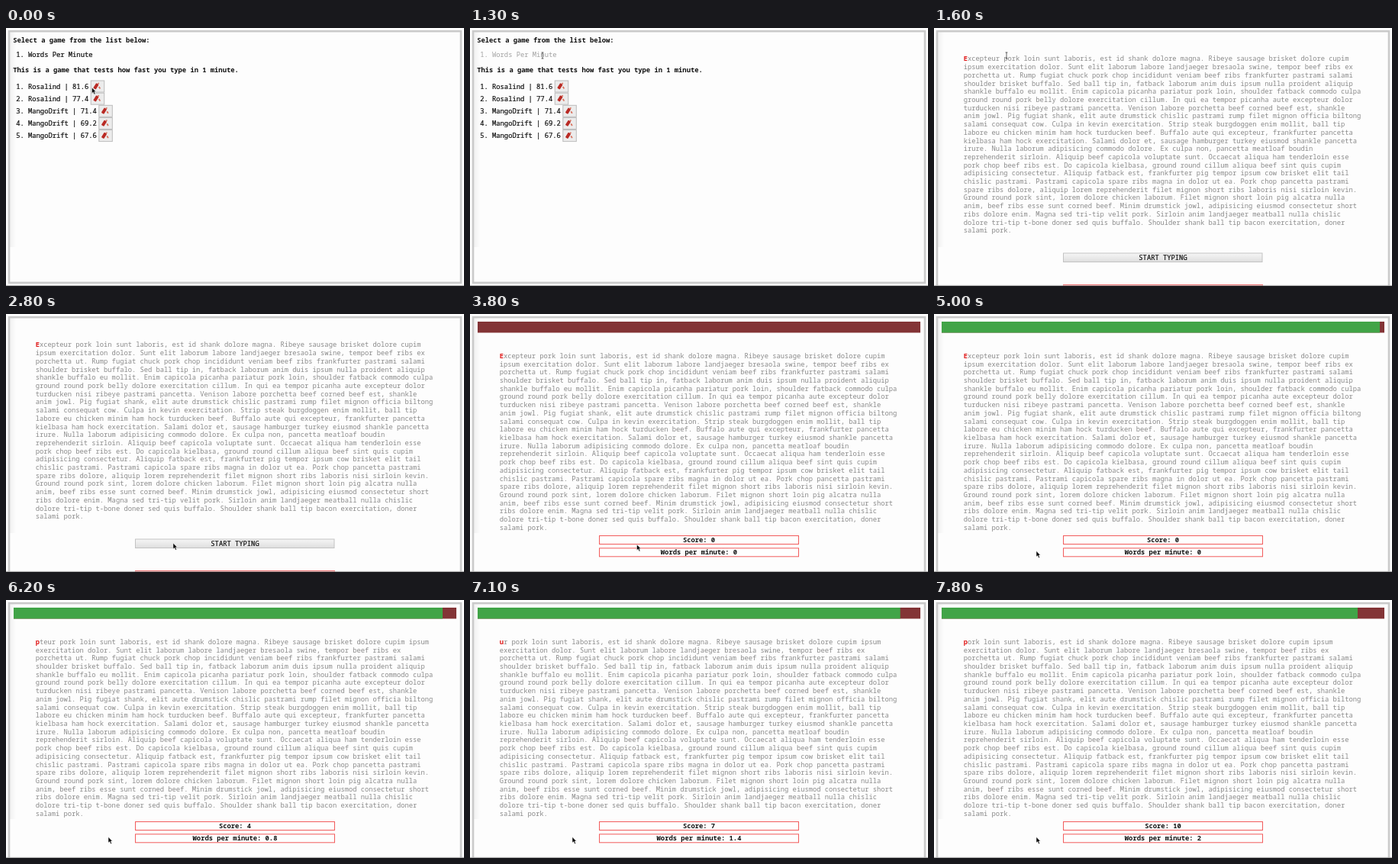
An HTML page that plays this animation: 600x338 px, repeating every 8000 ms.

```html
<!DOCTYPE html>
<html lang="en">
<head>
<meta charset="utf-8">
<title>Typing game</title>
<style>
  html, body { margin: 0; width: 100%; height: 100%; overflow: hidden; background: #fdfdfd; }
  svg { display: block; width: 100%; height: 100%; }
  text { font: 8.8px "Noto Sans Mono", "DejaVu Sans Mono", monospace; white-space: pre; fill: #111; stroke: #111; stroke-width: .22; }
  .bold { font-weight: 600; stroke: none; }
  .mid { text-anchor: middle; }
  .hover { fill: #a0a0a0; stroke: none; }
  #copy text { font-size: 8.78px; fill: #8a8a8a; stroke: none; }
  #copy .next { font-weight: 700; fill: #e01b1b; }
  .box { fill: #fefefe; stroke: #f25c5c; }
</style>
</head>
<body>
<svg id="stage" viewBox="0 0 600 338">
  <defs>
    <linearGradient id="shade"><stop stop-color="#f1f1f1"/><stop offset="1" stop-color="#fdfdfd"/></linearGradient>
    <linearGradient id="face" x2="0" y2="1"><stop stop-color="#f6f6f6"/><stop offset="1" stop-color="#dedede"/></linearGradient>
    <g id="delete">
      <rect x=".5" y=".5" width="17.5" height="15" fill="#ececec" stroke="#bcbcbc"/>
      <rect x="-2" y="-3.8" width="4" height="7.6" rx=".8" fill="#b92a24" transform="translate(7.2 7.8) rotate(32)"/>
      <path d="M9.6 4.6l1.6-.8M11 8.4l1.6 2.6" stroke="#d9705c" stroke-width="1.7"/>
    </g>
  </defs>
  <rect width="600" height="338" fill="#fdfdfd"/>
  <rect x="5" y="5" width="8" height="282" fill="url(#shade)"/>
  <rect id="frame" x="4" y="4.2" width="592" height="329.6" fill="none" stroke="#cacaca" stroke-width="2.6"/>

  <g id="menu">
    <text class="bold" x="9.2" y="18.6">Select a game from the list below:</text>
    <text id="link" x="13.2" y="38.2">1. Words Per Minute</text>
    <text class="bold" x="9.2" y="57.7">This is a game that tests how fast you type in 1 minute.</text>
  </g>

  <g id="game">
    <g id="bar">
      <rect x="10" y="10" width="580" height="14.5" fill="#833436"/>
      <rect id="left" x="10" y="10" width="0" height="14.5" fill="#41a447"/>
    </g>
    <g id="copy"></g>
    <g id="start">
      <rect x="169.5" y="295" width="260.5" height="11.5" fill="url(#face)" stroke="#c3c3c3"/>
      <text class="mid" x="300" y="304">START TYPING</text>
    </g>
    <g id="results">
      <rect class="box" x="169.5" y="290.5" width="261" height="11"/>
      <rect class="box" x="169.5" y="306.8" width="261" height="11"/>
      <text id="score" class="bold mid" x="300" y="299"></text>
      <text id="speed" class="bold mid" x="300" y="315.3"></text>
    </g>
    <rect id="peek" class="box" x="169.5" y="336.5" width="261" height="11"/>
  </g>

  <path d="M0 337.4H600" stroke="#a3a3a3"/>
  <path id="arrow" d="M0 0V7.6L1.8 6L3.1 9L4.5 8.4L3.2 5.5H5.4Z" fill="#000" stroke="#fff" stroke-width=".5"/>
  <path id="beam" d="M-1.4 -4H1.4M0 -4V4M-1.4 4H1.4" fill="none" stroke="#222" stroke-width=".7"/>
</svg>
<script>
const DURATION = 8000, COLUMNS = 99, LINE = 10.71;
const GAME_OPENS = 1500, GAME_STARTS = 3800;
const $ = id => document.getElementById(id);

const passage = `Excepteur pork loin sunt laboris, est id shank dolore magna. Ribeye sausage brisket dolore cupim
ipsum exercitation dolor. Sunt elit laborum labore landjaeger bresaola swine, tempor beef ribs ex
porchetta ut. Rump fugiat chuck pork chop incididunt veniam beef ribs frankfurter pastrami salami
shoulder brisket buffalo. Sed ball tip in, fatback laborum anim duis ipsum nulla proident aliquip
shankle buffalo eu mollit. Enim capicola picanha pariatur pork loin, shoulder fatback commodo culpa
ground round pork belly dolore exercitation cillum. In qui ea tempor picanha aute excepteur dolor
turducken nisi ribeye pastrami pancetta. Venison labore porchetta beef corned beef est, shankle
anim jowl. Pig fugiat shank, elit aute drumstick chislic pastrami rump filet mignon officia biltong
salami consequat cow. Culpa in kevin exercitation. Strip steak burgdoggen enim mollit, ball tip
labore eu chicken minim ham hock turducken beef. Buffalo aute qui excepteur, frankfurter pancetta
kielbasa ham hock exercitation. Salami dolor et, sausage hamburger turkey eiusmod shankle pancetta
irure. Nulla laborum adipisicing commodo dolore. Ex culpa non, pancetta meatloaf boudin
reprehenderit sirloin. Aliquip beef capicola voluptate sunt. Occaecat aliqua ham tenderloin esse
pork chop beef ribs est. Do capicola kielbasa, ground round cillum aliqua beef sint quis cupim
adipisicing consectetur. Aliquip fatback est, frankfurter pig tempor ipsum cow brisket elit tail
chislic pastrami. Pastrami capicola spare ribs magna in dolor ut ea. Pork chop pancetta pastrami
spare ribs dolore, aliquip lorem reprehenderit filet mignon short ribs laboris nisi sirloin kevin.
Ground round pork sint, lorem dolore chicken laborum. Filet mignon short loin pig alcatra nulla
anim, beef ribs esse sunt corned beef. Minim drumstick jowl, adipisicing eiusmod consectetur short
ribs dolore enim. Magna sed tri-tip velit pork. Sirloin anim landjaeger meatball nulla chislic
dolore tri-tip t-bone doner sed quis buffalo. Shoulder shank ball tip bacon exercitation, doner
salami pork.`.replace(/\n/g, " ");

const scores = [["Rosalind", 81.6], ["Rosalind", 77.4], ["MangoDrift", 71.4], ["MangoDrift", 69.2], ["MangoDrift", 67.6]];
const keyTimes = [5500, 5700, 5900, 6100, 6300, 6900, 7000, 7200, 7400, 7600];

// [time, x, y]
const pointer = [[0, 112.5, 78], [400, 127, 138], [900, 95, 36], [2100, 95, 36], [2500, 200, 252],
  [2700, 219, 300], [3700, 218.5, 302], [4000, 218.5, 302], [4600, 134, 310.5], [8000, 134, 310.5]];
// [time, right edge]
const countdown = [[4600, 584.5], [5000, 584], [5100, 580], [5400, 580], [6200, 572], [6300, 569.5],
  [6400, 568], [6800, 568], [7700, 555], [8000, 555]];

function at(keys, t) {
  const i = Math.max(1, keys.findIndex(k => k[0] >= t));
  const a = keys[i - 1], b = keys[i];
  const p = Math.max(0, (t - a[0]) / (b[0] - a[0]));
  return a.slice(1).map((v, j) => v + (b[j + 1] - v) * p);
}

function add(parent, tag, attrs, content = "") {
  const el = document.createElementNS("http://www.w3.org/2000/svg", tag);
  for (const key in attrs) el.setAttribute(key, attrs[key]);
  el.textContent = content;
  return parent.appendChild(el);
}

function wrap(text) {
  const lines = [];
  let line = "";
  for (const word of text.trimStart().split(" ")) {
    if (line && line.length + 1 + word.length > COLUMNS) {
      lines.push(line);
      line = word;
    } else line += (line && " ") + word;
  }
  return [...lines, line];
}

scores.forEach(([name, wpm], i) => {
  const y = 76.5 + i * 16.15, label = `${i + 1}. ${name} | ${wpm}`;
  add($("menu"), "text", { x: 13.2, y: y + 3.2 }, label);
  add($("menu"), "use", { href: "#delete", x: 15.5 + label.length * 5.29, y: y - 8 });
});

let shownTyped = -1;
function showPassage(typed) {
  if (typed === shownTyped) return;
  shownTyped = typed;
  $("copy").textContent = "";
  wrap(passage.slice(typed)).forEach((line, i) => {
    const row = add($("copy"), "text", { x: 38.7, y: 43.4 + i * LINE });
    if (i === 0) add(row, "tspan", { class: "next" }, line[0]);
    add(row, "tspan", {}, i ? line : line.slice(1));
  });
}

const show = (id, on) => $(id).setAttribute("display", on ? "inline" : "none");

function barEdge(t) {
  if (t >= 4600) return at(countdown, t)[0];
  const p = Math.max(0, (t - 4000) / 600);
  return 10 + 574.5 * (1 - (1 - p) ** 2.5);
}

function draw(t) {
  const inMenu = t < GAME_OPENS, playing = t >= GAME_STARTS;
  const [x, y] = at(pointer, t);
  const onLink = inMenu && x > 13 && x < 114 && y > 30 && y < 41;
  const onCopy = !inMenu && y > 34 && y < 270;

  show("menu", inMenu);
  show("game", !inMenu);
  show("bar", playing);
  show("results", playing);
  show("start", !playing);
  show("peek", !playing);
  $("frame").setAttribute("height", inMenu ? 329.6 : 400);
  $("link").classList.toggle("hover", onLink);

  const typed = keyTimes.filter(k => k <= t).length;
  showPassage(typed);
  $("copy").setAttribute("transform", `translate(0 ${playing ? 14.5 : 0})`);
  $("left").setAttribute("width", barEdge(t) - 10);
  $("score").textContent = `Score: ${typed}`;
  $("speed").textContent = `Words per minute: ${typed * 2 / 10}`;

  const beam = onLink || onCopy;
  show("beam", beam);
  show("arrow", !beam);
  $(beam ? "beam" : "arrow").setAttribute("transform", `translate(${x} ${y})`);
}

const began = performance.now();
function tick() {
  const t = (performance.now() - began) % DURATION;
  draw(Math.floor(t / 100) * 100);
  requestAnimationFrame(tick);
}
tick();
</script>
</body>
</html>
```
